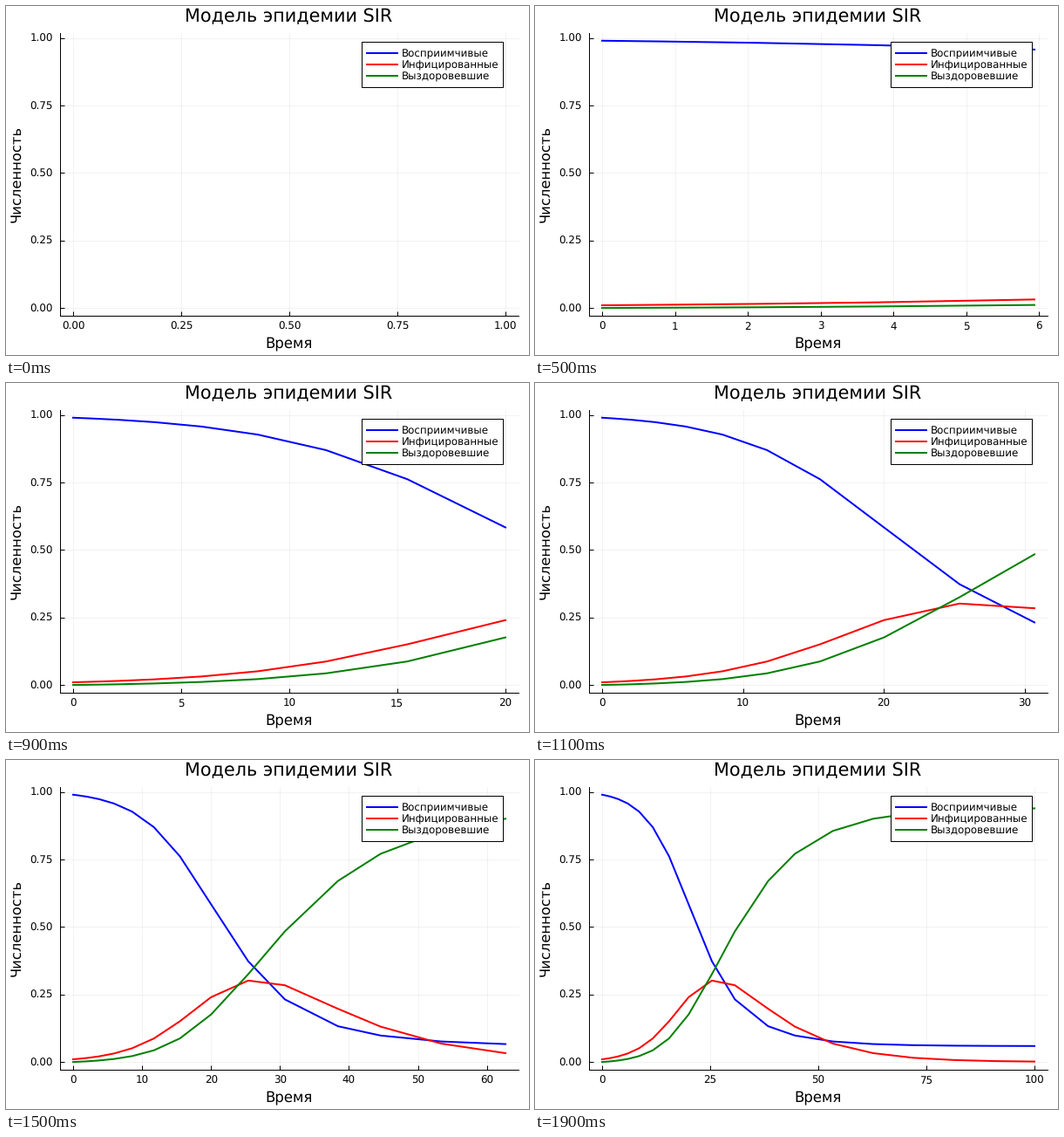
These frames come from a looping animation (600 by 400 pixels, 2 s). A matplotlib script:

```python
import math

import matplotlib.pyplot as plt
import numpy as np
from matplotlib.animation import FuncAnimation
from matplotlib.patches import Rectangle

plt.rcParams["font.family"] = "DejaVu Sans"
plt.rcParams["text.hinting"] = "none"

W, H = 600, 400
PX = 0.72  # points per pixel at 100 dpi
BETA, GAMMA = 0.3, 0.1
TIMES = [0, 0.1113, 0.807, 2.1, 3.78, 5.94, 8.55, 11.71, 15.48, 20.02,
         25.39, 30.71, 38.4, 44.58, 53.37, 62.7, 72.0, 81.5, 91.0, 100]
SERIES = [("Восприимчивые", "#0000ff"),
          ("Инфицированные", "#ff0000"),
          ("Выздоровевшие", "#008000")]

# Plot area in pixels
X0, X1 = 77, 573
Y0, UNIT = 346.1, 309.4
PAD = 0.03
LEFT, RIGHT = X0 - PAD * (X1 - X0), X1 + PAD * (X1 - X0)
BOTTOM, TOP = Y0 + 0.0297 * UNIT, Y0 - 1.0197 * UNIT


def rate(u):
    s, i, _ = u
    return np.array([-BETA * s * i, BETA * s * i - GAMMA * i, GAMMA * i])


def solve(times, substeps=40):
    """Runge-Kutta solution of the SIR system at the given times."""
    u = np.array([0.99, 0.01, 0.0])
    out = [u]
    for a, b in zip(times, times[1:]):
        h = (b - a) / substeps
        for _ in range(substeps):
            k1 = rate(u)
            k2 = rate(u + h / 2 * k1)
            k3 = rate(u + h / 2 * k2)
            k4 = rate(u + h * k3)
            u = u + h / 6 * (k1 + 2 * k2 + 2 * k3 + k4)
        out.append(u)
    return np.array(out)


def nice_ticks(hi):
    """Best-scoring tick values from zero to just past hi, with decimals."""
    span = (1 + 2 * PAD) * hi
    best, choice = -math.inf, None
    order = math.floor(math.log10(hi))
    for z in (order, order - 1):
        for q, nice in ((1, 1.0), (5, 0.9), (2.5, 0.5), (2, 0.7), (3, 0.2)):
            step = q * 10.0 ** z
            n = math.floor((1 + PAD) * hi / step + 1e-9) + 1
            if not 4 <= n <= 8:
                continue
            score = ((1 - abs(n - 5) / 5) / 4
                     + 0.5 * span / ((n - 1) * step) + nice / 4)
            if score > best + 1e-9:
                best = score
                choice = step * np.arange(n), max(0, (q == 2.5) - z)
    return choice


TIMES = np.array(TIMES, float)
STATES = solve(TIMES)

fig = plt.figure(figsize=(W / 100, H / 100), dpi=100, facecolor="white")
ax = fig.add_axes([0, 0, 1, 1])


def line(xs, ys, color="black", width=1.0, **kw):
    ax.plot(xs, ys, color=color, lw=width * PX, **kw)


def text(x, y, s, size, ha="center", **kw):
    ax.text(x, y, s, fontsize=size * PX, ha=ha, va="baseline", **kw)


def draw_axes(hi):
    values, digits = nice_ticks(hi)
    xs = X0 + values / hi * (X1 - X0)
    levels = np.arange(5) / 4
    ys = Y0 - levels * UNIT
    for x in xs:
        line([x, x], [TOP, BOTTOM], alpha=0.05)
    for y in ys:
        line([LEFT, RIGHT], [y, y], alpha=0.05)

    line([LEFT, RIGHT], [BOTTOM, BOTTOM])
    line([LEFT, LEFT], [TOP, BOTTOM])
    for x, v in zip(xs, values):
        line([x, x], [BOTTOM, BOTTOM - 5], solid_capstyle="butt")
        text(x, 371.1, f"{v:.{digits}f}", 11.9)
    for y, v in zip(ys, levels):
        line([LEFT, LEFT + 5], [y, y], solid_capstyle="butt")
        text(54.1, y + 4.3, f"{v:.2f}", 11.9, ha="right")

    text(324.4, 18, "Модель эпидемии SIR", 20.8)
    text(325, 391.3, "Время", 16.5)
    text(16.4, 192.3, "Численность", 16.4,
         rotation=90, rotation_mode="anchor")


def draw_legend():
    ax.add_patch(Rectangle((408, 41), 162, 52, fc="white", ec="black",
                           lw=PX, zorder=5))
    for k, (name, color) in enumerate(SERIES):
        y = 54.1 + 13 * k
        line([414, 448.5], [y, y], color, 2, zorder=6)
        text(453.7, y + 4.3, name, 11.9, ha="left", zorder=6)


def draw(frame):
    ax.clear()
    ax.set_xlim(0, W)
    ax.set_ylim(H, 0)
    ax.axis("off")
    hi = TIMES[frame] or 1.0
    draw_axes(hi)
    if frame:
        xs = X0 + TIMES[:frame + 1] / hi * (X1 - X0)
        for k, (_, color) in enumerate(SERIES):
            line(xs, Y0 - STATES[:frame + 1, k] * UNIT, color, 2, zorder=3)
    draw_legend()
    return []


anim = FuncAnimation(fig, draw, frames=len(TIMES), interval=100,
                     init_func=lambda: [], repeat=True, repeat_delay=0)
plt.show()
```
